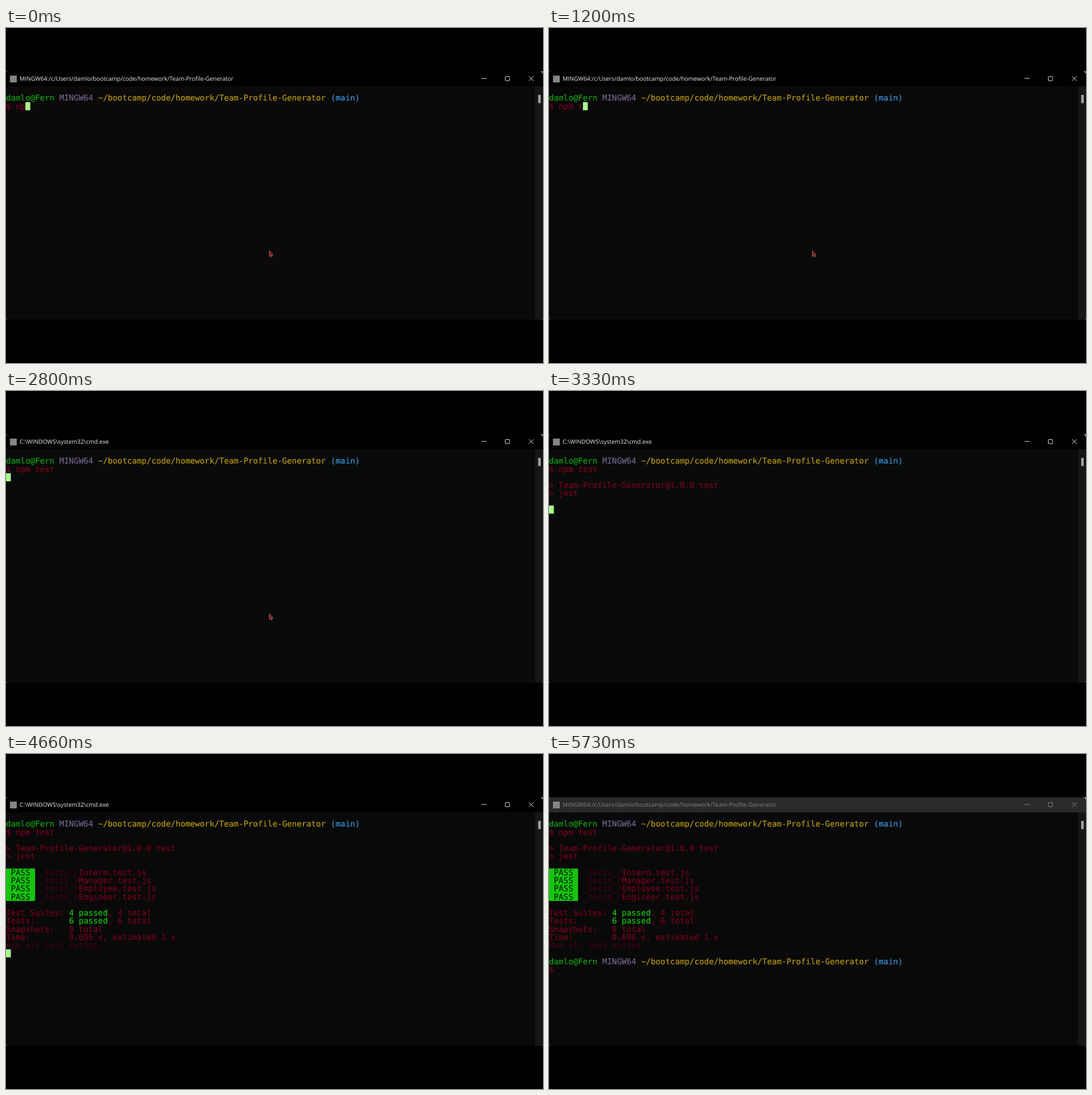
These frames come from a looping animation (947x591 px, 5.8 s). An HTML page:

```html
<!DOCTYPE html>
<html lang="en">
<head>
<meta charset="utf-8">
<title>Terminal test run</title>
<style>
  html, body { margin: 0; width: 100%; height: 100%; overflow: hidden; background: #000; }
  svg { display: block; width: 947px; height: 591px; }
  text { white-space: pre; text-rendering: geometricPrecision; }
  #term text { font: 14.2px "DejaVu Sans Mono", monospace; stroke-width: .2; }
  #title { font: 10.3px "Open Sans", "Noto Sans", sans-serif; fill: #f0f0f0; }
  #buttons { fill: none; stroke: #e2e2e2; }
  #bar { fill: #000; }
  .inactive #bar { fill: #2a2a2a; }
  .inactive #title { fill: #858585; }
  .inactive #buttons { stroke: #8c8c8c; }
</style>
</head>
<body>
<svg id="stage" viewBox="0 0 947 591">
  <rect id="bar" y="76.5" width="947" height="26.5"/>
  <rect id="screen" y="103" width="947" height="411.4" fill="#090909"/>
  <rect x="933" y="103" width="14" height="411.4" fill="#161616"/>
  <rect x="938.5" y="118" width="4.5" height="14.5" fill="#a0a0a0"/>
  <path d="M942 76.5H947V81Q946 77.5 942 76.5Z" fill="#b8b8b8"/>
  <path d="M0 76.5H3Q1 77 0 79.5ZM0 511.5Q.5 514 3 514.4H0ZM947 511.5Q946.5 514 944 514.4H947Z" fill="#555"/>
  <rect x="7" y="84" width="12" height="12" fill="#858585"/>
  <text id="title" x="24" y="93.3"></text>
  <g id="buttons">
    <path d="M838.5 89H847.5"/>
    <rect x="880.5" y="85.5" width="7.5" height="7.5" rx="1"/>
    <path d="M922.2 85L930.6 93.4M930.6 85L922.2 93.4"/>
  </g>
  <g id="term"></g>
  <path id="mouse" d="M464.3 392.5V403.2L466.7 401L468.2 404.2L469.6 403.5L468.2 400.4H471.2Z"
        fill="#8a1414" stroke="#b59a96" stroke-width=".6"/>
</svg>
<script>
const LOOP = 5800, CELL = 8.549, ROW = 14.25, TOP = 116.6;
const RED = '#78031d', DIM = '#420511', LIME = '#16c60c';
const KEYS = [300, 700, 1000, 1400, 1700, 2000];
const ENTER = 2600, LAUNCH = 2800, HEADER = 3060, RUNS = 3700, DONE = 4400, PROMPT = 5000, BLUR = 5530;
const SHELL = 'MINGW64:/c/Users/damlo/bootcamp/code/homework/Team-Profile-Generator';
const CMD = 'C:\\WINDOWS\\system32\\cmd.exe';

const $ = id => document.getElementById(id);
const term = $('term');
const timed = [];

function add(parent, tag, attrs) {
  const el = document.createElementNS('http://www.w3.org/2000/svg', tag);
  for (const key in attrs) el.setAttribute(key, attrs[key]);
  return parent.appendChild(el);
}

function group(from, to = LOOP) {
  const el = add(term, 'g', {});
  timed.push({ el, from, to });
  return el;
}

function put(parent, row, col, text, color) {
  const el = add(parent, 'text', { x: col * CELL, y: TOP + row * ROW + 11.7, fill: color, stroke: color });
  el.textContent = text;
  return el;
}

// Runs alternate between text and colour.
function line(parent, row, ...runs) {
  let col = 0;
  for (let i = 0; i < runs.length; i += 2) {
    put(parent, row, col, runs[i], runs[i + 1]);
    col += runs[i].length;
  }
}

function badge(parent, row, word, back, ink, file) {
  add(parent, 'rect', { y: TOP + row * ROW, width: 6 * CELL, height: ROW + .1, fill: back });
  line(parent, row, ` ${word} `, ink, ' _tests_/', DIM, `${file}.test.js`, RED);
}

function prompt(parent, row) {
  line(parent, row, 'damlo@Fern ', '#14a010', 'MINGW64 ', '#75628c',
    '~/bootcamp/code/homework/Team-Profile-Generator ', '#b99710', '(main)', '#3a93d6');
}

prompt(group(0), 0);
const typed = put(term, 1, 0, '', RED);

const header = group(HEADER);
line(header, 3, '> Team-Profile-Generator@1.0.0 test', RED);
line(header, 4, '> jest', RED);

badge(group(RUNS, DONE), 7, 'RUNS', '#80001d', '#240006', 'Intern');

const results = group(DONE);
['Intern', 'Manager', 'Employee', 'Engineer'].forEach((file, i) =>
  badge(results, 6 + i, 'PASS', LIME, '#042804', file));
line(results, 11, 'Test Suites: ', RED, '4 passed', LIME, ', 4 total', RED);
line(results, 12, 'Tests:       ', RED, '6 passed', LIME, ', 6 total', RED);
line(results, 13, 'Snapshots:   0 total', RED);
line(results, 14, 'Time:        0.696 s, estimated 1 s', RED);
line(results, 15, 'Ran all test suites.', DIM);

const end = group(PROMPT);
prompt(end, 17);
line(end, 18, '$', RED);

const caret = add(term, 'rect', { width: CELL, height: ROW, fill: '#a8fb8c' });
const show = (el, on) => el.setAttribute('visibility', on ? 'visible' : 'hidden');

function caretCell(t, chars) {
  if (t < ENTER) return [1, 2 + chars];
  if (t < HEADER) return [2, 0];
  if (t < RUNS) return [6, 0];
  if (t < DONE) return [8, 0];
  if (t < PROMPT) return [16, 0];
  return [18, 2];
}

function tint(t) {
  if (t < 600) return '#0b090a';
  return t >= LAUNCH && t < RUNS ? '#080b0a' : '#090909';
}

const start = performance.now();

function draw() {
  const t = (performance.now() - start) % LOOP;
  const chars = 2 + KEYS.filter(k => k <= t).length;
  typed.textContent = '$ ' + 'npm test'.slice(0, chars);
  for (const { el, from, to } of timed) show(el, t >= from && t < to);

  const [row, col] = caretCell(t, chars);
  caret.setAttribute('x', col * CELL);
  caret.setAttribute('y', TOP + row * ROW);
  show(caret, t < BLUR);
  show($('mouse'), t < HEADER);

  $('title').textContent = t >= LAUNCH && t < PROMPT ? CMD : SHELL;
  $('screen').setAttribute('fill', tint(t));
  $('stage').classList.toggle('inactive', t >= BLUR);
  requestAnimationFrame(draw);
}
draw();
</script>
</body>
</html>
```
